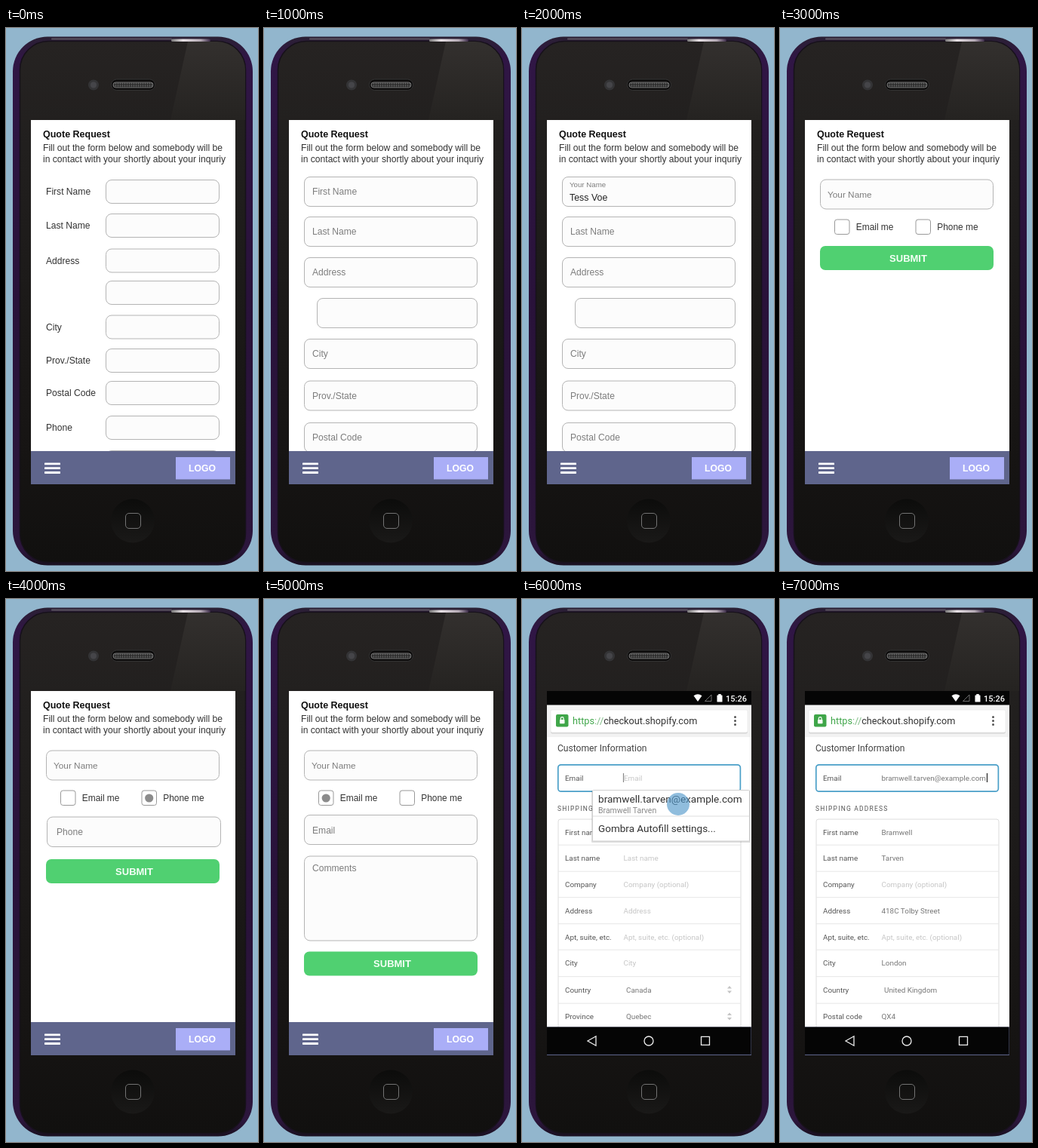
Recreate the animation shown at these times as an HTML page. Size 334 by 720 pixels, loop 8000 ms.

```html
<!DOCTYPE html>
<html lang="en">
<head>
<meta charset="utf-8">
<title>Mobile form patterns</title>
<style>
html, body { margin: 0; width: 100%; height: 100%; overflow: hidden; background: #92b6cd; }
svg { display: block; width: 334px; height: 720px; }
text { font-family: "Liberation Sans", Arial, sans-serif; font-size: 12.1px; fill: #333; }
.web text { font-family: Roboto, sans-serif; font-size: 9.9px; fill: #555; }
</style>
</head>
<body>
<svg id="stage" viewBox="0 0 334 720"></svg>
<script>
const STEP = 1000;

const attrs = o => Object.entries(o).map(([k, v]) => ` ${k}="${v}"`).join("");
const box = (x, y, w, h, r, fill, more = {}) =>
  `<rect${attrs({ x, y, width: w, height: h, rx: r, fill, ...more })}/>`;
const circle = (cx, cy, r, fill, more = {}) => `<circle${attrs({ cx, cy, r, fill, ...more })}/>`;
const path = (d, fill, more = {}) => `<path${attrs({ d, fill, ...more })}/>`;
// Text is placed by the vertical middle of its capitals.
const text = (s, x, mid, style = "") =>
  `<text x="${x}" y="${mid + 4}" style="${style}">${s}</text>`;

// ---- phone body ----
const gradient = (id, stops, dir) => `<linearGradient id="${id}" ${dir}>` +
  stops.map(([at, c]) => `<stop offset="${at}" stop-color="${c}"/>`).join("") + "</linearGradient>";
const DOWN = 'x2="0" y2="1"';

const phone = `<defs>
  ${gradient("rim", [[0, "#2a2033"], [.04, "#301645"], [.5, "#29123a"], [.97, "#2c163c"], [1, "#191020"]], DOWN)}
  ${gradient("face", [[0, "#262322"], [.2, "#211f1e"], [.8, "#161413"], [1, "#11100f"]], DOWN)}
  ${gradient("glare", [[0, "#33302e"], [1, "#252321"]], DOWN)}
  ${gradient("shine", [[0, "#777"], [.3, "#e6e0e4"], [.75, "#b5aab5"], [1, "#3c2b48"]], "")}
  ${gradient("home", [[0, "#0c0c0b"], [1, "#1a1918"]], DOWN)}
  <pattern id="mesh" width="3" height="3" patternUnits="userSpaceOnUse">
    ${box(0, 0, 3, 3, 0, "#2b2b2b")}${circle(1.5, 1.5, .9, "#666")}
  </pattern>
  <clipPath id="faceClip">${box(19, 18, 298, 690, 38, "#000")}</clipPath>
  <clipPath id="screenClip">${box(33, 122, 271, 483, 0, "#000")}</clipPath>
</defs>` +
  box(0, 0, 334, 720, 0, "#92b6cd") +
  box(9, 11.5, 318, 701, 46, "url(#rim)") +
  box(18.5, 17.5, 299, 691, 38, "url(#face)", { stroke: "#17111b", "stroke-width": 1.5 }) +
  `<g clip-path="url(#faceClip)">${path("M241 18H318V122H218Z", "url(#glare)")}</g>` +
  box(60, 13.5, 160, 2, 1, "#5c5561") +
  box(219, 14.5, 52, 3.5, 1.5, "url(#shine)") +
  circle(116, 75.5, 7, "#343436") + circle(116, 75.5, 4, "#454549") +
  box(139.5, 68, 58, 14.5, 7.2, "#0d0c0c", { stroke: "#333" }) +
  box(142, 72, 53, 7, 3.5, "url(#mesh)", { stroke: "#757575" }) +
  circle(168, 653.5, 29, "url(#home)") +
  box(158.5, 643.5, 20, 20, 4.5, "none", { stroke: "#737373" });

// ---- quote form ----
const GREY = "fill:#7d7d7d";
const field = (x, y, right, h) =>
  box(x + .5, y + .5, right - x - 1, h - 1, 7.5, "#fcfcfc", { stroke: "#b4b4b4" });
const submit = y => box(53, y, 230, 32, 7, "#50d071") +
  text("SUBMIT", 170, y + 16.5, "fill:#f4fff6;font-size:13px;font-weight:bold;text-anchor:middle");
const choice = (x, label, on) =>
  box(x + .5, 254, 19.5, 19.5, 3, "#fff", { stroke: "#999" }) +
  (on ? circle(x + 10.2, 264, 5.6, "#8b8b8b") : "") + text(label, x + 28.8, 263.5, "font-size:11.9px");

const quote = body => box(33, 122, 271, 483, 0, "#fff") +
  text("Quote Request", 49, 140.5, "font-size:12.5px;font-weight:bold;fill:#111") +
  text("Fill out the form below and somebody will be", 49, 159) +
  text("in contact with your shortly about your inquriy", 49, 174) + body +
  box(33, 561, 271, 44, 0, "#5f658c") +
  [576.5, 582.3, 588.1].map(y => box(51, y, 21, 2.8, .6, "#fff")).join("") +
  box(225, 569, 72, 29.5, 0, "#aaaef7") +
  text("LOGO", 242, 584, "font-size:12.2px;font-weight:bold;fill:#fff");

const sideLabels = () => [
  ["First Name", 201], ["Last Name", 246], ["Address", 292.5], ["", 335], ["City", 380.5],
  ["Prov./State", 425], ["Postal Code", 468], ["Phone", 514], ["", 560]
].map(([label, y]) => field(132, y, 283, 32) + text(label, 53, y + 16.3)).join("");

const innerLabels = first => field(53, 197, 283, 40) + first + [
  ["Last Name", 250], ["Address", 304], ["", 358], ["City", 412], ["Prov./State", 467.5], ["Postal Code", 523]
].map(([label, y]) => field(label ? 53 : 70, y, 283, 40) + text(label, 64, y + 20.2, GREY)).join("");

const contact = (mode, rest) => field(53, 200.5, 283, 40) +
  text("Your Name", 63, 220.5, GREY + ";font-size:11.8px") +
  choice(72, "Email me", mode === "email") + choice(179.5, "Phone me", mode === "phone") + rest;

// ---- checkout page ----
const PALE = "fill:#c6c6c6";
const INK = "fill:#777";
const ROW_MIDS = [309, 343.5, 378.5, 413, 448, 482.5, 518, 553.5];
const LABELS = ["First name", "Last name", "Company", "Address", "Apt, suite, etc.", "City", "Country"];
const HINTS = ["First name", "Last name", "Company (optional)", "Address", "Apt, suite, etc. (optional)", "City"];

const row = (label, value, i, hint, indent) =>
  text(label, 57, ROW_MIDS[i] - .5) +
  text(value, indent ? 138 : 134.5, ROW_MIDS[i] - .5, hint ? PALE : INK) +
  (i ? path(`M48 ${ROW_MIDS[i] - 17.3}H290`, "none", { stroke: "#e6e6e6" }) : "");
const arrows = y => path(`M272 ${y - 1.5}l3 -3.5 3 3.5zM272 ${y + 1.5}l3 3.5 3 -3.5z`, "#c4c4c4");

const checkout = (email, rows, overlay) => `<g class="web">` +
  box(33, 122, 271, 483, 0, "#fff") +
  box(33, 140, 271, 43, 0, "#f2f2f2") +
  box(38, 148.5, 261, 30, 2, "#d2d2d2") + box(38, 147, 261, 30, 2, "#fff", { stroke: "#e4e4e4", "stroke-width": .6 }) +
  box(45, 153, 16.5, 16.5, 2, "#3fa649") +
  box(50, 160, 6.5, 5.3, .8, "#fff") +
  path("M51.3 160v-1.5a1.9 1.9 0 0 1 3.8 0v1.5", "none", { stroke: "#fff", "stroke-width": 1.2 }) +
  text(`<tspan fill="#3fa649">https</tspan><tspan fill="#7ab980">://</tspan>checkout.shopify.com`,
    67, 162, "font-size:12.7px;fill:#333") +
  [156.5, 161.5, 166.5].map(y => circle(282.5, y, 1.5, "#555")).join("") +
  text("Customer Information", 47, 198, "font-size:12.1px;fill:#444") +
  box(47.8, 219.8, 241.6, 35.4, 4, "#fff", { stroke: "#4a9fc8", "stroke-width": 1.7 }) +
  text("Email", 57, 236.5) + email +
  text("SHIPPING ADDRESS", 47, 276.5, "font-size:8.5px;letter-spacing:1.2px;fill:#555") +
  box(48, 292, 242, 300, 3, "#fff", { stroke: "#dcdcdc" }) + rows + overlay +
  box(33, 122, 271, 18.5, 0, "#050505") +
  path("M227.5 128.2q5.5 -4 11 0L233 136Z", "#fff") +
  path("M251 127v8.5h-8.5z", "none", { stroke: "#888", "stroke-width": .8 }) +
  box(258.5, 127.5, 7, 9, .6, "#fff") + box(260.3, 126, 3.4, 2, 0, "#fff") +
  text("15:26", 270, 131.5, "font-size:11px;font-weight:500;fill:#fff") +
  box(33, 567.5, 271, 37.5, 0, "#5f658c") + box(33, 567.5, 270.5, 36.5, 0, "#050505") +
  path("M87 586L98 579.8V592.2ZM237.5 580.3h11v11h-11z", "none", { stroke: "#eee", "stroke-width": 1.3 }) +
  circle(168, 586, 6, "none", { stroke: "#eee", "stroke-width": 1.3 }) + "</g>";

const emptyRows = () => HINTS.map((h, i) => row(LABELS[i], h, i, true)).join("") +
  row("Country", "Canada", 6, false, true) + row("Province", "Quebec", 7, false, true) +
  arrows(518) + arrows(553.5);
const filledRows = () =>
  ["Bramwell", "Tarven", HINTS[2], "418C Tolby Street", HINTS[4], "London", "United Kingdom"]
    .map((v, i) => row(LABELS[i], v, i, v === HINTS[i], i === 6)).join("") +
  row("Postal code", "QX4", 7);

const ADDRESS = "bramwell.tarven@example.com";
const suggestions = () =>
  box(92, 254, 211, 69, 1, "#000", { opacity: .13 }) +
  box(93.5, 253.5, 208, 67.5, 1, "#fff", { stroke: "#cfcfcf" }) +
  text(ADDRESS, 101, 265.5, "font-size:13.6px;fill:#333") +
  text("Bramwell Tarven", 101, 279.5, "font-size:10.5px;fill:#888") +
  path("M94 288H301", "none", { stroke: "#ddd" }) +
  text("Gombra Autofill settings...", 101, 305, "font-size:13.5px;fill:#333") +
  circle(207, 272, 15, "#4c94c8", { opacity: .62 });
const caret = (x, color) => path(`M${x} 231V243`, "none", { stroke: color, "stroke-width": 1.2 });

// ---- sequence ----
const scenes = [
  quote(sideLabels()),
  quote(innerLabels(text("First Name", 64, 217, GREY))),
  quote(innerLabels(text("Your Name", 63, 206.8, GREY + ";font-size:9.7px") +
    text("Tess Voe", 63, 224.5, "font-size:12.4px;fill:#222"))),
  quote(contact("", submit(289))),
  quote(contact("phone", field(54, 288.5, 285, 40.5) + text("Phone", 67, 309, GREY) + submit(345))),
  quote(contact("email", field(53, 286, 283, 40) + text("Email", 64, 307, GREY) +
    field(53, 340.5, 283, 113) + text("Comments", 64, 357, GREY) + submit(467.5))),
  checkout(text("Email", 135, 236.5, PALE) + caret(134.5, "#888"), emptyRows(), suggestions()),
  checkout(text(ADDRESS, 134.5, 236.5, INK) + caret(274.5, "#222"), filledRows(), "")
];

const stage = document.getElementById("stage");
stage.innerHTML = phone + `<g clip-path="url(#screenClip)">` +
  scenes.map(s => `<g class="scene">${s}</g>`).join("") + "</g>";

// Each scene is opaque in its own slot of the loop and hidden in the others.
stage.querySelectorAll(".scene").forEach((scene, i) => {
  const slots = scenes.map((_, slot) => ({
    offset: slot / scenes.length, opacity: slot === i ? 1 : 0, easing: "step-end"
  }));
  scene.animate([...slots, { offset: 1, opacity: 0 }],
    { duration: scenes.length * STEP, iterations: Infinity });
});
</script>
</body>
</html>
```
